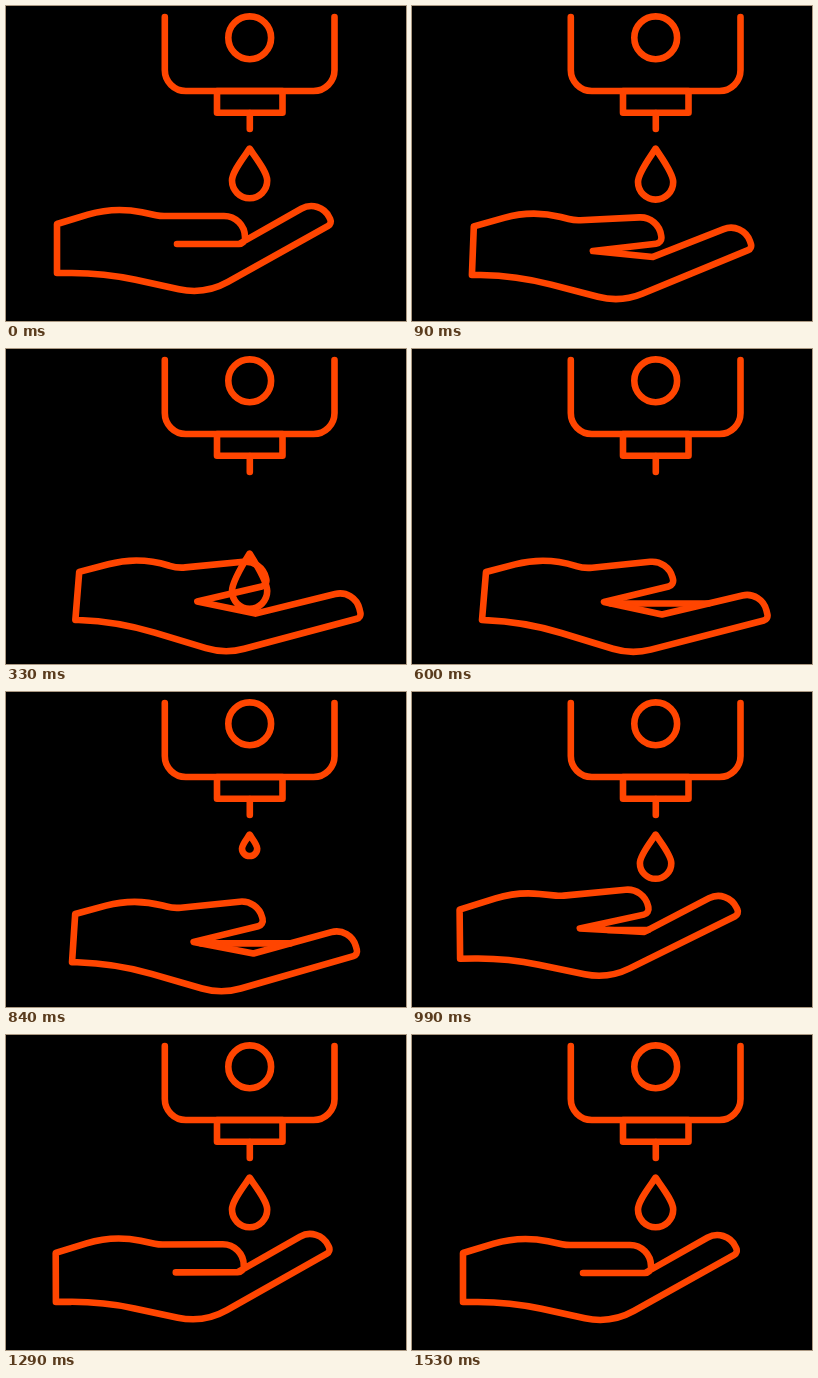
An HTML page for the animation above (3620 ms loop, 400 by 315 pixels).

```html
<!DOCTYPE html>
<html lang="en">
<head>
<meta charset="utf-8">
<title>Hand sanitizer</title>
<style>
  html, body { margin: 0; width: 100%; height: 100%; overflow: hidden; background: #000; }
  svg { display: block; width: 100%; height: 100%; }
  g { fill: none; stroke: #ff4500; stroke-width: 6.6; stroke-linecap: round; stroke-linejoin: round; }
</style>
</head>
<body>
<svg viewBox="0 0 400 315">
  <g>
    <path d="M158.8 11V64a21 21 0 0 0 21 21H307.5a21 21 0 0 0 21-21V11"/>
    <circle cx="243.7" cy="31.8" r="21.4"/>
    <path d="M211 85H276.5V106.8H211Z"/>
    <path d="M243.8 107V123"/>
    <path id="drop"/>
    <path id="liquid"/>
    <path id="hand"/>
  </g>
</svg>
<script>
const LOOP = 3620, STEP = 30;

// Corners of the hand: moving part, place at rest, place when open, rounding.
// Thumb corners are measured from the crotch between thumb and palm.
const joints = {
  wristTop:  ['arm', [51, 218], [74, 223], 0],
  hump:      ['arm', [108.6, 200.6], [133.5, 207.5], 110],
  dip:       ['thumb', [-17, -28], [-20, -33.5], 40],
  thumbTop:  ['thumb', [68, -28], [64, -42], 21],
  thumbEnd:  ['thumb', [68, 0], [70.5, -17], 6],
  crotch:    ['arm', [171, 238], [192, 253], 0],
  palm:      ['finger', [233, 238], [250, 265.5], 0],
  fingerTop: ['finger', [314, 192.2], [350, 241.8], 20],
  fingerEnd: ['finger', [326.3, 217.5], [356.5, 270.3], 5],
  heel:      ['arm', [198.8, 288.9], [219.7, 305.5], 70],
  forearm:   ['arm', [98, 267], [112, 272.6], 300],
  wristEnd:  ['arm', [51, 267], [70, 271], 0]
};
const names = Object.keys(joints);

const span = (t, a, b) => Math.min(1, Math.max(0, (t - a) / (b - a)));
const smooth = (t, a, b) => { const u = span(t, a, b); return u * u * (3 - 2 * u); };
const mix = (p, q, k) => p.map((v, i) => v + (q[i] - v) * k);
const add = (p, q, k = 1) => [p[0] + q[0] * k, p[1] + q[1] * k];
const set = (id, d) => document.getElementById(id).setAttribute('d', d);

function unit(from, to) {
  const v = add(to, from, -1), n = Math.hypot(...v);
  return [v[0] / n, v[1] / n];
}

// Tilts a point up and to the left about the wrist.
function lean([px, py], k) {
  const a = -0.014 * k, c = Math.cos(a), s = Math.sin(a);
  const x = px - 51, y = py - 240;
  return [51 + x * c - y * s - 4.2 * k, 240 + x * s + y * c - 0.4 * k];
}

// The hand opens as one, then closes arm first, finger next, thumb last.
function handPose(t) {
  const opened = 0.94 * smooth(t, 0, 180) + 0.06 * smooth(t, 150, 540);
  const amount = {
    arm: opened - smooth(t, 780, 990),
    finger: opened - smooth(t, 773, 1060),
    thumb: opened - smooth(t, 920, 1200)
  };
  const overshoot = smooth(t, 800, 1080) * (1 - span(t, 1080, 1530)) ** 2;
  const place = name => {
    const [part, rest, open] = joints[name];
    return mix(rest, open, amount[part]);
  };
  const pose = {};
  for (const name of names) {
    let p = place(name);
    if (joints[name][0] === 'thumb') p = add(p, place('crotch'));
    pose[name] = lean(p, overshoot);
  }
  return pose;
}

function corner(a, b, c, r) {
  if (!r) return `L${b}`;
  const u = unit(b, a), v = unit(b, c);
  const cos = u[0] * v[0] + u[1] * v[1];
  const cut = r * Math.sqrt((1 + cos) / (1 - cos));
  const sweep = u[1] * v[0] - u[0] * v[1] > 0 ? 1 : 0;
  return `L${add(b, u, cut)}A${r} ${r} 0 0 ${sweep} ${add(b, v, cut)}`;
}

function handPath(pose) {
  const n = names.length, at = i => pose[names[(i + n) % n]];
  const parts = names.map((name, i) => corner(at(i - 1), at(i), at(i + 1), joints[name][3]));
  return 'M' + parts.join('').slice(1) + 'Z';
}

// Water surface inside the V between palm and finger.
function liquidPath({ crotch, palm, fingerTop }, t) {
  const fill = smooth(t, 330, 500);
  const y = palm[1] + (crotch[1] + 1.5 - palm[1]) * fill;
  if (!fill || palm[1] - y < 0.3) return '';
  const meet = p => palm[0] + (p[0] - palm[0]) * (y - palm[1]) / (p[1] - palm[1]);
  return `M${meet(crotch)} ${y}H${meet(fingerTop)}`;
}

// The drop stretches, falls and sinks into the palm; a new one grows.
function dropPath(t) {
  let size = 1, stretch = 0, top = 142.6;
  if (t < 570) {
    stretch = 5.5 * span(t, 0, 180) ** 2;
    size = 1 - span(t, 330, 420);
    top += 62 * span(t, 180, 330) ** 2 + (1 - size) * 55;
  } else {
    size = smooth(t, 640, 1080);
  }
  if (size < 0.02) return '';
  const x = 243.6, r = 17.6 * size, mid = top + (32 + stretch) * size;
  const neck = top + 8 * size, hip = mid - 9 * size, w = 5 * size;
  return `M${x} ${top}C${x - w} ${neck} ${x - r} ${hip} ${x - r} ${mid}` +
    `A${r} ${r} 0 0 0 ${x + r} ${mid}C${x + r} ${hip} ${x + w} ${neck} ${x} ${top}Z`;
}

function draw(now) {
  const t = Math.floor((now % LOOP) / STEP) * STEP;
  const pose = handPose(t);
  set('hand', handPath(pose));
  set('liquid', liquidPath(pose, t));
  set('drop', dropPath(t));
}

let start;
function tick(now) {
  start ??= now;
  draw(now - start);
  requestAnimationFrame(tick);
}
draw(0);
requestAnimationFrame(tick);
</script>
</body>
</html>
```
